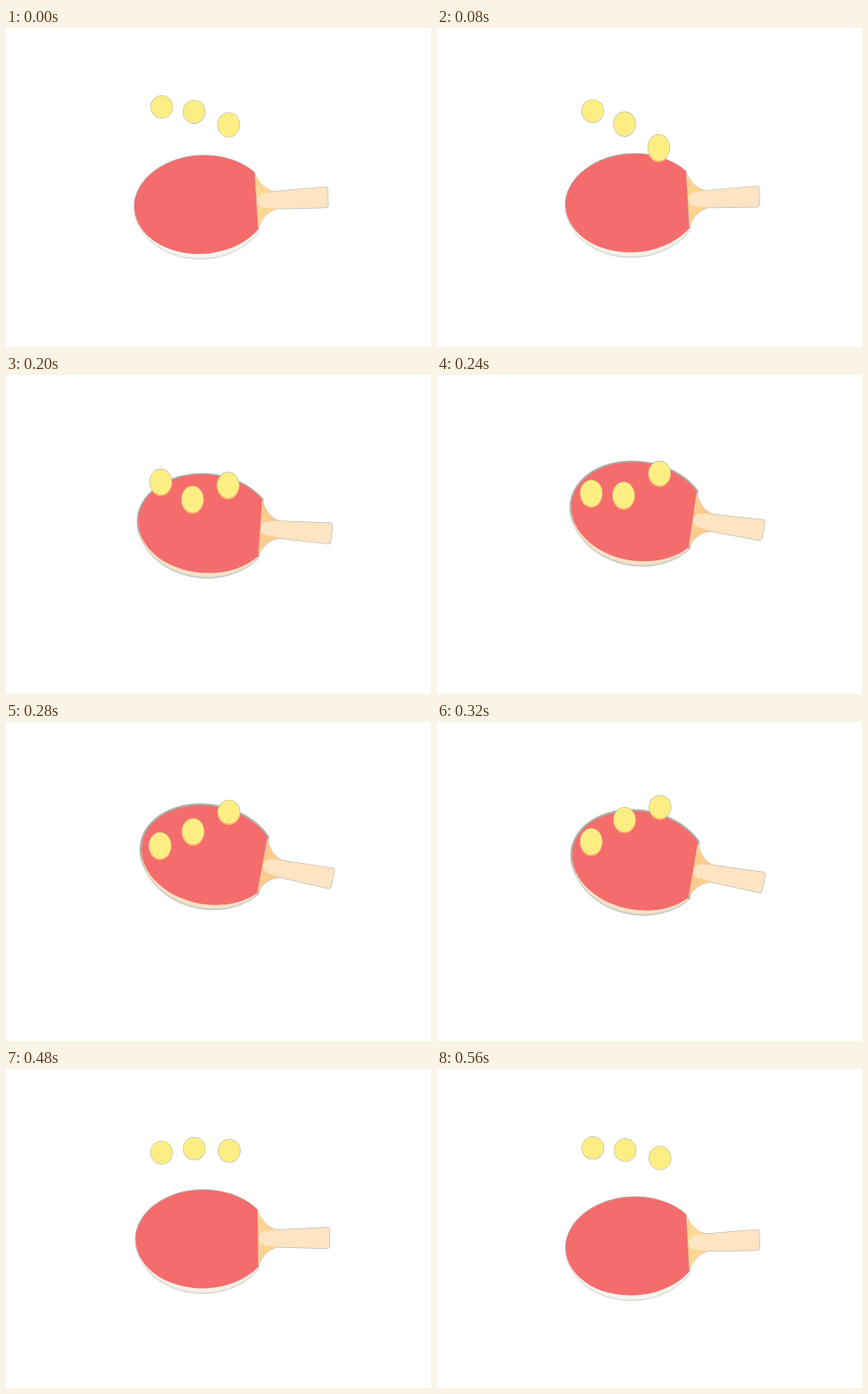
An HTML page that plays this animation: 480x360 px, repeating every 600 ms.

```html
<!DOCTYPE html>
<html lang="en">
<head>
<meta charset="utf-8">
<title>Table tennis</title>
<style>
  html, body { margin: 0; width: 100%; height: 100%; overflow: hidden; background: #fff; }
  svg { display: block; width: 480px; height: 360px; }
</style>
</head>
<body>
<svg viewBox="0 0 480 360">
  <defs>
    <path id="blade" d="M62-32.1A76 55.5 0 1 0 62 32.1Z"/>
    <clipPath id="face"><use id="mask" href="#blade"/></clipPath>
    <path id="grip" d="M72-8.3Q80-9 90-9.2L140-10.8Q143.3-10.8 143.2-8L142.6 9.8Q142.4 12.5 139.5 12.4L90 10.3Q80 9.5 72 8.2C60 7.5 60-7.5 72-8.3Z"/>
  </defs>
  <g id="paddle">
    <use id="outline" href="#blade" fill="none" stroke="#a9aea8"/>
    <path id="under" stroke="#b4bab4" stroke-width=".6"/>
    <path id="rim"/>
    <use href="#grip" fill="none" stroke="#bcbfb4" stroke-width="1.4"/>
    <path id="throat" d="M62-32Q68.5-13 84-9V10.5Q68.5 14 62 32Z" stroke="#c3bfae" stroke-width=".6"/>
    <use href="#blade" fill="#f56c6d"/>
    <use href="#grip" fill="#fde4c3"/>
  </g>
  <g id="edges" fill="none" stroke="#b4b9ae" stroke-width="1.2"></g>
  <g id="glows" clip-path="url(#face)" fill="#fbb56b"></g>
  <g id="balls" fill="#fdee83"></g>
</svg>
<script>
const LOOP = 600, STEP = 40, TURN = 2 * Math.PI / LOOP;
const $ = id => document.getElementById(id);
const clamp = v => Math.max(0, Math.min(1, v));

function set(el, attrs) {
  for (const k in attrs) el.setAttribute(k, attrs[k]);
}

function ellipse(layer) {
  return $(layer).appendChild(document.createElementNS("http://www.w3.org/2000/svg", "ellipse"));
}

// Soft periodic pulse: 1 at s = 0, 0 half a loop away
function pulse(s) {
  const a = s * TURN;
  return 0.372 + 0.469 * Math.cos(a) + 0.128 * Math.cos(2 * a) + 0.03 * Math.cos(3 * a);
}

function mix(a, b, k) {
  return `rgb(${a.map((c, i) => Math.round(c + (b[i] - c) * k))})`;
}

// Lower half of the blade, with its own depth
function bowl(ry) {
  const y = ry * Math.sqrt(1 - (62 / 76) ** 2);
  return `M-76 0A76 ${ry} 0 0 0 62 ${y}L62 0Z`;
}

// From right to left, each ball follows 80 ms after the one before
const balls = [252.2, 212.6, 176].map((x, i) => ({
  x, low: 123 + 80 * i, top: 90.4 - 0.8 * i,
  edge: ellipse("edges"), glow: ellipse("glows"), body: ellipse("balls")
}));

function drawPaddle(t) {
  const a = (t - 280) * TURN, lift = pulse(t - 284);
  const swing = 14 * lift + 1.3 * Math.sin(a);
  const x = 221 + 0.53 * swing;
  const y = 200 - 49.8 * pulse(t - 280)
    - 2.6 * Math.sin(a) + 0.6 * Math.sin(2 * a) + 1.8 * Math.sin(3 * a);
  const transform = `translate(${x} ${y}) rotate(${swing - 3.6})`;
  const warm = clamp(2.5 * lift);

  set($("paddle"), { transform });
  set($("mask"), { transform });
  set($("outline"), { "stroke-width": 1.2 + 3 * lift });
  set($("under"), { d: bowl(61.3), fill: mix([244, 244, 239], [200, 214, 205], warm) });
  set($("rim"), { d: bowl(59.6), fill: mix([246, 244, 239], [253, 224, 197], warm) });
  set($("throat"), { fill: mix([252, 215, 145], [253, 203, 140], warm) });
}

function drawBall(b, t) {
  const drop = pulse(t - b.low);
  const cx = b.x - 2 * drop, cy = b.top + 50.8 * drop;
  const rx = 12.2, ry = 12.5 + 2.2 * clamp(1.3 * drop);
  set(b.edge, { cx, cy, rx, ry });
  set(b.glow, { cx, cy: cy + 0.7, rx: rx + 0.5, ry: ry + 1 });
  set(b.body, { cx, cy, rx, ry });
}

function draw(t) {
  drawPaddle(t);
  for (const b of balls) drawBall(b, t);
}

function tick(now) {
  draw(Math.floor((now % LOOP) / STEP) * STEP);
  requestAnimationFrame(tick);
}
draw(0);
requestAnimationFrame(tick);
</script>
</body>
</html>
```
